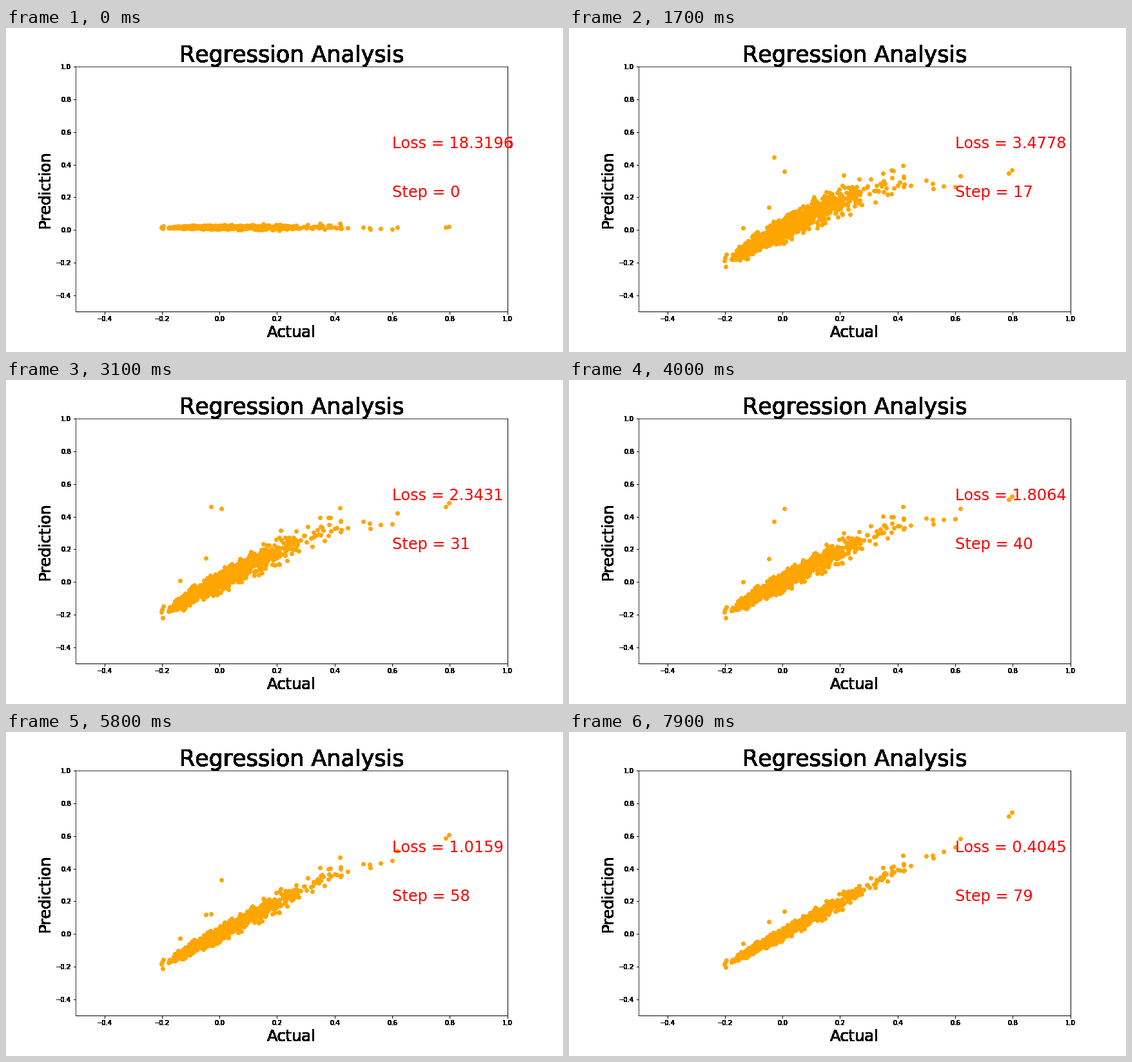
These frames come from a looping animation (864 by 504 pixels, 8000 ms). A matplotlib script:

```python
import numpy as np
import matplotlib.pyplot as plt
from matplotlib.animation import FuncAnimation
from matplotlib.transforms import Bbox

W, H, DPI = 864, 504, 72
STEPS = 80
WARM_UP = 8    # steps until the predictions have left their common start
START = 0.017  # value that every prediction begins near
rng = np.random.default_rng(11)

# Training progress: loss, and the level at which predictions saturate
KEYS = [0, 8, 17, 31, 50, 58, 79]
LOSS = [18.3196, 5.9876, 3.4778, 2.3431, 1.3529, 1.0159, 0.4045]
CAP = [0.1, 0.18, 0.35, 0.5, 0.64, 0.75, 1.5]

# Main cloud: skewed in x, with two noise parts that blend over time
cloud_x = rng.gamma(3, 0.068, 1250) - 0.19
cloud_x = cloud_x[(cloud_x > -0.18) & (cloud_x < 0.43)]
cloud_noise = np.clip(rng.standard_t(6, (2, len(cloud_x))), -3.3, 3.3)
cloud_noise *= 1 + 2 * cloud_x

# Lone points at both ends: x and their error in units of the spread
lone_x = [-0.202, -0.2, -0.197, -0.195, 0.446, 0.498, 0.521, 0.523,
          0.559, 0.599, 0.617, 0.785, 0.798]
lone_noise = [0, 0.7, -2, 1.5, -1.2, -0.4, -1.5, -3, -2.5, -3, 0, 0.2, 1.2]

# Outliers that rise and sink again: x, height, middle step, duration
OUTLIERS = np.array([
    [-0.030, 0.51, 25, 30],
    [0.006, 0.45, 36, 39],
    [-0.047, 0.19, 31, 70],
    [-0.137, 0.14, 15, 75],
])
out_x, out_height, out_mid, out_time = OUTLIERS.T

x = np.concatenate([cloud_x, lone_x, out_x])
noise_a, noise_b = np.zeros((2, len(x)))
n = len(cloud_x)
noise_a[:n], noise_b[:n] = cloud_noise
noise_a[n:n + len(lone_x)] = lone_noise


def predictions(step):
    cap = np.interp(step, KEYS, CAP)
    fit = np.where(x > 0, cap * np.tanh(x / cap), 0.92 * x)
    # Brief overshoot of the low end
    dip = 0.08 * np.exp(-((step - 12) / 2.5) ** 2)
    fit -= dip * np.clip(-x / 0.2, 0, 1)

    turn = 1.2 * np.exp(-step / 25)
    noise = np.cos(turn) * noise_a + np.sin(turn) * noise_b
    fit += 0.032 * np.exp(-step / 80) * noise
    fit[-len(out_x):] += out_height * np.exp(-((step - out_mid) / out_time) ** 2)

    grown = min(step / WARM_UP, 1)
    return grown * fit + (1 - grown) * (START + 0.004 * noise_a)


def harden(image, dpi):
    """Make every touched pixel opaque."""
    image = image.copy()
    image[..., 3] = image[..., 3] > 0
    return image, 0, 0


plt.rcParams.update({"font.family": "DejaVu Sans", "font.size": 10,
                     "text.kerning_factor": 6})
fig = plt.figure(figsize=(W / DPI, H / DPI), dpi=DPI, facecolor="white")
ax = fig.add_axes([0.125, 0.125, 0.775, 0.755])
ax.set(xlim=(-0.5, 1), ylim=(-0.5, 1))
title = ax.set_title("Regression Analysis", fontsize=35)
ax.set_xlabel("Actual", fontsize=24)
ax.set_ylabel("Prediction", fontsize=24)

dots = ax.scatter(x, predictions(0), color="orange")
red = dict(fontsize=24, color="red")
step_text = ax.text(0.6, 0.2, "", **red)
loss_text = ax.text(0.6, 0.5, "", **red)
# Same text again, only where it runs past the plot area
loss_edge = ax.text(0.6, 0.5, "", clip_on=True, **red)
loss_edge.set_clip_box(Bbox.from_extents(778, 0, W, H))

# Whatever lies outside the plot area has hard edges
for part in (title, ax.xaxis, ax.yaxis, ax.spines["right"],
             ax.spines["bottom"], loss_edge):
    part.set_agg_filter(harden)


def update(step):
    loss = np.exp(np.interp(step, KEYS, np.log(LOSS)))
    dots.set_offsets(np.column_stack([x, predictions(step)]))
    for text in (loss_text, loss_edge):
        text.set_text(f"Loss = {loss:.4f}")
    step_text.set_text(f"Step = {step}")
    return dots, step_text, loss_text, loss_edge


anim = FuncAnimation(fig, update, frames=STEPS, interval=100,
                     repeat=True, repeat_delay=0, blit=False)
plt.show()
```
